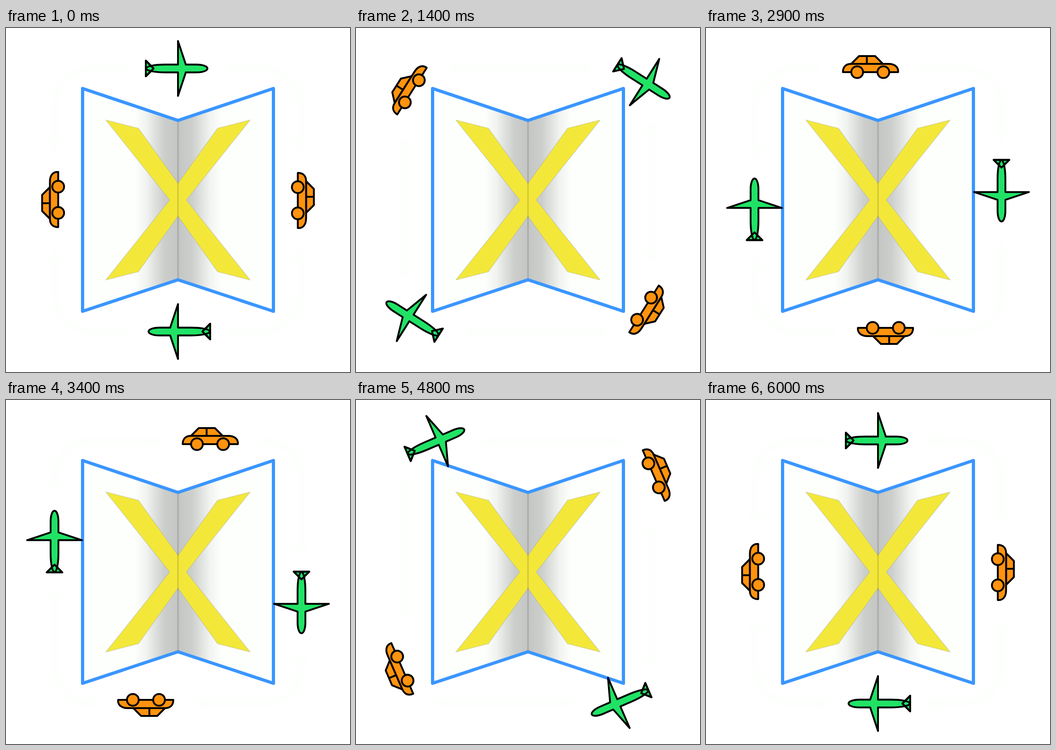
An HTML page that plays this animation: 748x748 px, repeating every 6100 ms.

```html
<!DOCTYPE html>
<html lang="en">
<head>
<meta charset="utf-8">
<title>Folded page with circling vehicles</title>
<style>
  html, body { margin: 0; width: 100%; height: 100%; overflow: hidden; background: #fff; }
  svg { display: block; width: 100vw; height: 100vh; }
</style>
</head>
<body>
<svg viewBox="0 0 748 748">
  <defs>
    <linearGradient id="fold" gradientUnits="userSpaceOnUse" x1="280" x2="468" y1="0" y2="0">
      <stop offset="0" stop-color="#c4c6c4" stop-opacity="0"/>
      <stop offset=".13" stop-color="#c4c6c4" stop-opacity=".2"/>
      <stop offset=".34" stop-color="#c4c6c4" stop-opacity=".85"/>
      <stop offset=".5" stop-color="#c4c6c4"/>
      <stop offset=".66" stop-color="#c4c6c4" stop-opacity=".85"/>
      <stop offset=".87" stop-color="#c4c6c4" stop-opacity=".2"/>
      <stop offset="1" stop-color="#c4c6c4" stop-opacity="0"/>
    </linearGradient>
    <g id="plane" fill="#20e366" stroke="#000" stroke-width="4" stroke-linejoin="round">
      <path d="M-70-17L-53 0L-70 17Z"/>
      <path d="M-69 0C-69-5-50-8.5-28-8.5H0V-59.7L17-8.5H40C56-8.5 64-4 64 0S56 8.5 40 8.5H17L0 59.7V8.5H-28C-50 8.5-69 5-69 0Z"/>
      <path d="M-70-17L-53 0L-70 17Z" fill="none"/>
    </g>
    <g id="car" fill="#ff930f" stroke="#000" stroke-width="4" stroke-linejoin="round">
      <path d="M-41-10L-24-27H11L28-10Z"/>
      <path d="M-7-27V-10"/>
      <path d="M-59 8C-59-3-53-10-41-10H40C55-10 62-2 61 8Z"/>
      <circle cx="-28" cy="8" r="12.8"/>
      <circle cx="29" cy="8" r="12.8"/>
    </g>
  </defs>
  <rect width="748" height="748" fill="#fff"/>
  <g id="arrows" fill="none" stroke="#fdfffd"></g>
  <g stroke-linejoin="round">
    <path id="page" d="M166.5 131.5L374 201L581.5 131.5V616L374 547.5L166.5 616Z" fill="#fdfffc"/>
    <path d="M280 169.5L374 201L468 169.5V578.5L374 547.5L280 578.5Z" fill="url(#fold)"/>
    <path d="M217 200L288 218L374 338L460 218L531 200L392 374L531 548L460 530L374 409L288 530L217 548L356 374Z"
      fill="#f3e83a" stroke="#a0a0a0" stroke-opacity=".35" stroke-width="1.8"/>
    <path d="M374 201V547" stroke="#000" stroke-opacity=".13" stroke-width="3.5"/>
    <path d="M166.5 131.5L374 201L581.5 131.5V616L374 547.5L166.5 616Z" fill="none" stroke="#3a96ff" stroke-width="7"/>
  </g>
  <g id="fleet"></g>
</svg>
<script>
const LOOP = 6100, STEP = 100, TURN = 3000, SPEED = 0.173;
const C = 374, HALF_W = 268.5, HALF_H = 286;

// Corner poses: time, offset past the corner, inward offset, turn angle
const WIDE = [
  [1000, -95.5, 0, 0], [1100, -77, 1, 8.5], [1200, -56, 7, 17], [1400, -15, 29.5, 32.4],
  [1600, 2.5, 50.5, 49.5], [1800, 11.8, 72.3, 66.6], [1900, 12, 88, 76], [2000, 0, 113, 90]
];
const TIGHT = [
  [1000, -113, 0, 0], [1200, -79, 5, 17], [1400, -45.8, 9, 32.3], [1600, -18, 36, 49.5],
  [1800, -1.5, 71, 66.7], [1900, -4, 83, 76], [2000, 0, 95.5, 90]
];

const NS = "http://www.w3.org/2000/svg";
const $ = id => document.getElementById(id);

function add(parent, tag, attrs) {
  const el = document.createElementNS(NS, tag);
  for (const k in attrs) el.setAttribute(k, attrs[k]);
  return parent.appendChild(el);
}

function corner(keys, time) {
  const i = Math.max(1, keys.findIndex(k => k[0] >= time));
  const p = keys[i - 1], q = keys[i];
  const u = (time - p[0]) / (q[0] - p[0]);
  return [1, 2, 3].map(n => p[n] + (q[n] - p[n]) * u);
}

// Pose after `time` ms for a vehicle that began mid-side (0 top, 1 right, ...)
function pose(side, time) {
  side += Math.floor(time / TURN);
  time %= TURN;
  const wide = side % 2 === 0;
  const reach = wide ? HALF_W : HALF_H, out = wide ? HALF_H : HALF_W;
  let a, b, turn;
  if (time <= 1000) [a, b, turn] = [SPEED * time - reach, 0, 0];
  else if (time >= 2000) [a, b, turn] = [0, out - SPEED * (TURN - time), 90];
  else [a, b, turn] = corner(wide ? WIDE : TIGHT, time);
  return `translate(${C} ${C}) rotate(${side * 90}) translate(${reach + a} ${b - out}) rotate(${turn})`;
}

const fleet = [0, 1, 2, 3].map(side =>
  add($("fleet"), "use", { href: side % 2 ? "#car" : "#plane" }));

// Pale double arrows gliding along a rounded track
const R = 82.7, LENGTH = 4 * TURN * SPEED, SPAN = 262;
const track = add($("arrows"), "path", {
  stroke: "none",
  d: `M374 88H${642.5 - R}a${R} ${R} 0 0 1 ${R} ${R}V${660 - R}a${R} ${R} 0 0 1 ${-R} ${R}` +
     `H${105.5 + R}a${R} ${R} 0 0 1 ${-R} ${-R}V${88 + R}a${R} ${R} 0 0 1 ${R} ${-R}Z`
});
const arrows = [0, 1, 2, 3].map(() => ({
  shaft: add($("arrows"), "path", { "stroke-width": 16 }),
  heads: [-1, 1].map(dir => ({
    dir, el: add($("arrows"), "path", { d: "M0-17L26 0L0 17Z", fill: "#fdfffd", stroke: "none" })
  }))
}));

function at(s) {
  return track.getPointAtLength((s + LENGTH) % LENGTH);
}

function drawArrow(arrow, mid) {
  let d = "";
  for (let i = 0; i <= 40; i++) {
    const p = at(mid + SPAN * (i / 40 - 0.5));
    d += (i ? "L" : "M") + p.x.toFixed(1) + " " + p.y.toFixed(1);
  }
  arrow.shaft.setAttribute("d", d);
  for (const { dir, el } of arrow.heads) {
    const s = mid + dir * SPAN / 2, p = at(s), q = at(s + dir * 4);
    const angle = Math.atan2(q.y - p.y, q.x - p.x) * 180 / Math.PI;
    el.setAttribute("transform", `translate(${p.x} ${p.y}) rotate(${angle})`);
  }
}

let shown = -1;
function render(now) {
  const time = Math.floor((now % LOOP) / STEP) * STEP;
  if (time === shown) return;
  shown = time;
  fleet.forEach((el, side) => el.setAttribute("transform", pose(side, time)));
  arrows.forEach((arrow, i) => drawArrow(arrow, SPEED * time + LENGTH * (i / 4 + 1 / 8)));
}

const start = performance.now();
function tick() {
  render(performance.now() - start);
  requestAnimationFrame(tick);
}
tick();
</script>
</body>
</html>
```
